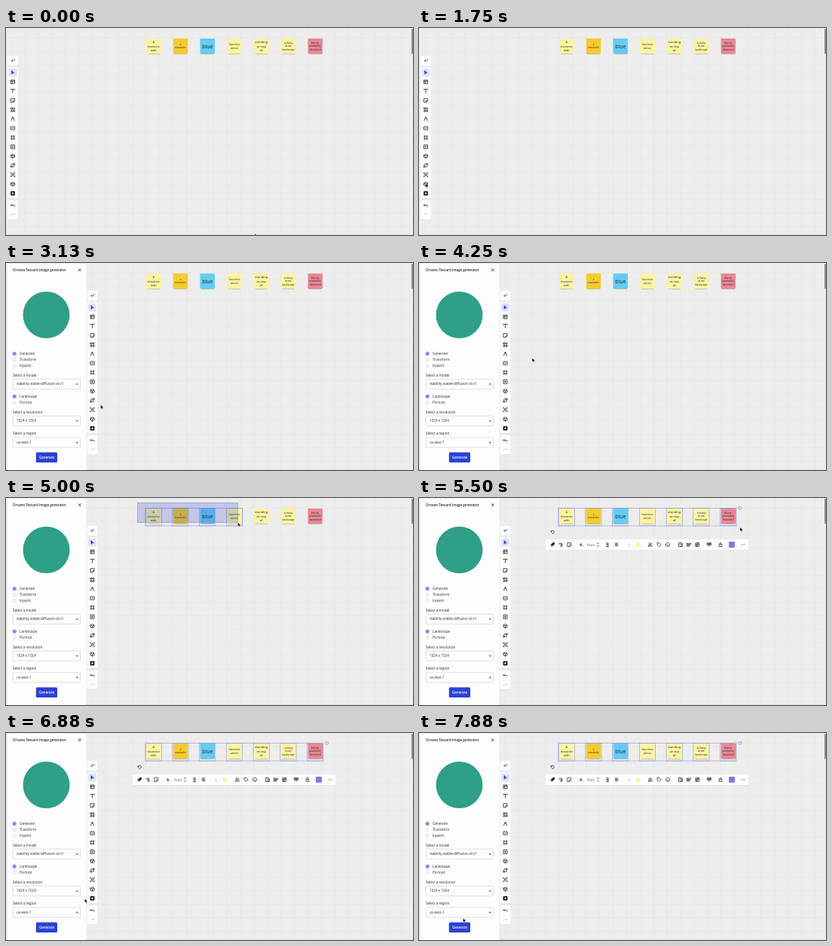
Write an HTML page that moves like this. It is 540x275 px and loops after 8000 ms.

```html
<!DOCTYPE html>
<html lang="en">
<head>
<meta charset="utf-8">
<title>Image generator board</title>
<style>
  html, body { margin: 0; width: 100%; height: 100%; overflow: hidden; background: #ededed; }
  svg { display: block; width: 540px; height: 275px; font-family: "Open Sans", "Noto Sans", sans-serif; fill: #2b2b33; }
  .icon { fill: none; stroke: #1c1c24; stroke-width: .8; stroke-linejoin: round; }
  .edge { fill: none; stroke: #8792d6; stroke-width: .55; }
</style>
</head>
<body>
<svg id="stage" viewBox="0 0 540 275"></svg>
<script>
const LOOP = 8000, STEP = 125;
const BLUE = '#2b42d4', INK = '#1c1c24';

const rect = (x, y, w, h, fill, extra = '') =>
  `<rect x="${x}" y="${y}" width="${w}" height="${h}" fill="${fill}" ${extra}/>`;
const text = (x, y, size, str, extra = '') =>
  `<text x="${x}" y="${y}" font-size="${size}" ${extra}>${str}</text>`;
const icon = (x, y, d, extra = '') =>
  `<path class="icon" transform="translate(${x} ${y})" d="${d}" ${extra}/>`;
const group = (id, body) => `<g id="${id}">${body}</g>`;
const card = (x, y, w, h) =>
  rect(x, y + .4, w, h, '#e0e0e3', 'rx="1.8"') + rect(x, y, w, h, '#fdfdfd', 'rx="1.8"');

const shape = {
  spark: 'M-.6-1.9v3.8M-2.5 0h3.8M2-2.2v1.6M1.2-1.4h1.6',
  arrow: 'M-1.6-2.7L2 .7L.2 .9L-1.6 2.4Z',
  layout: 'M-2.5-2.4h5v4.8h-5zM-2.5-.8h5M-.6-.8v3.2',
  type: 'M-2.6-1.4v-1.1h5.2v1.1M0-2.5v5.1',
  sticky: 'M-2.5-2.4h5v3l-1.9 1.9h-3.1zM2.5 .6h-1.9v1.9',
  shapes: 'M-2.6-2.5h2.2v2h-2.2zM1.6-2.6a1 1 0 1 0 .1 0M-1.5 .5l-1.2 2h2.4zM.7 .7h1.9v1.8h-1.9z',
  pen: 'M-2 2.5L-1.1-1L0-2.6L1.1-1L2 2.5M0-2.4v2',
  comment: 'M-2.6-2.1h5.2v4h-2l-.6 .7l-.6-.7h-2zM-1 0h2',
  frame: 'M-1.7-2.8v5.6M1.7-2.8v5.6M-2.8-1.7h5.6M-2.8 1.7h5.6',
  plus: 'M-2.5-2.5h5v5h-5zM-1.3 0h2.6M0-1.3v2.6',
  cube: 'M0-2.6L2.5-1.4V1.4L0 2.6L-2.5 1.4V-1.4ZM-2.5-1.4L0-.1L2.5-1.4M0-.1V2.6',
  link: 'M-2.7 .5h2v2h-2zM.6-2.5h2v2h-2zM-2-.6q0-1.4 1.7-1.4M2 .6q0 1.5-1.7 1.5',
  focus: 'M-2.7-1.3v-1.4h1.4M1.3-2.7h1.4v1.4M2.7 1.3v1.4h-1.4M-1.3 2.7h-1.4v-1.4M-1.2-1.2h2.4v2.4h-2.4z',
  undo: 'M-1.4-1.8L-2.6-.6L-1.4 .6M-2.6-.6H1q1.6 .1 1.6 2'
};

function grid() {
  const gap = 17.87;
  let d = '';
  for (let x = 7.3; x < 540; x += gap) d += `M${x.toFixed(1)} 0v275`;
  for (let y = 13.2; y < 275; y += gap) d += `M0 ${y.toFixed(1)}h540`;
  return `<path d="${d}" stroke="#e6e6e6" stroke-width=".8"/>`;
}

const YELLOW = '#fbf3a2';
const notes = [
  [YELLOW, 3.8, 'A', 'character', 'with'],
  ['#f3cb2f', 2.8, 'a', 'moustache'],
  ['#64ccf5', 7, 'blue'],
  [YELLOW, 3.6, 'futuristic', 'armor'],
  [YELLOW, 4.2, 'standing', 'on top', 'of'],
  [YELLOW, 3.5, 'a dusty', 'dune', 'landscape'],
  ['#ea8794', 3.5, 'blurry,', 'pixelated,', 'distorted']
];
const noteX = i => 195.8 + i * 35.75;

function note([fill, size, ...lines], i) {
  const x = noteX(i), gap = size * 1.34;
  const top = 24.2 - (lines.length - 1) * gap / 2 + size * .35;
  return rect(x - 8.2, 33.6, 16.4, 1.5, '#a5a48f', 'rx=".7" opacity=".75"') +
    rect(x - 9.7, 14, 19.4, 20.2, fill) +
    lines.map((s, n) => text(x, top + n * gap, size, s, 'text-anchor="middle" fill="#24241c"')).join('');
}

function toolbar() {
  const names = ['layout', 'type', 'sticky', 'shapes', 'pen', 'comment', 'frame', 'plus', 'cube', 'link', 'focus'];
  return card(2, 37, 14, 13) + card(2, 52, 14, 174) + card(2, 229, 14, 25) +
    icon(9, 43.5, shape.spark, 'style="stroke:#4a5cc0"') +
    rect(3.5, 53.5, 11, 11, '#dfe4ff', 'rx="1.5"') +
    icon(9, 59, shape.arrow, `style="stroke:${BLUE};fill:${BLUE};stroke-width:.5"`) +
    names.map((n, i) => icon(9, 71.5 + i * 12.33, shape[n])).join('') +
    group('hover', rect(3.5, 202, 11, 11, '#dfe4ff', 'rx="1.5"')) +
    icon(9, 207.5, shape.cube, 'id="app"') +
    rect(6.1, 216.7, 5.8, 5.8, INK, 'rx=".8"') +
    icon(9, 219.6, 'M-1.5 0h3M0-1.5v3', 'style="stroke:#fff"') +
    icon(9, 236, shape.undo) +
    `<g transform="translate(9 248) scale(-1 1)">${icon(0, 0, shape.undo, 'style="stroke:#cfcfd4"')}</g>`;
}

const radio = (y, label, on) =>
  `<circle cx="11.2" cy="${y}" r="2.1" fill="#fff" stroke="${on ? BLUE : '#bdbdc5'}" stroke-width="${on ? .8 : .5}"/>` +
  (on ? `<circle cx="11.2" cy="${y}" r="1.1" fill="${BLUE}"/>` : '') +
  text(18, y + 1.6, 4.65, label);
const select = (y, label, value) =>
  text(9, y - 3.4, 4.6, label) +
  rect(9.2, y, 89.4, 13.2, '#fdfdfd', 'rx="1.3" stroke="#c9c9d0" stroke-width=".6"') +
  text(14, y + 8.2, 4.6, value) +
  `<path d="M92.5 ${y + 6}h3.6l-1.8 1.9z" fill="#55555f"/>`;

function panel() {
  return rect(2, 1, 104.5, 276, '#fdfdfd', 'rx="1.5"') +
    text(9, 11, 4.5, 'Orvano Tessard image generator', 'font-weight="600"') +
    icon(97.7, 9.2, 'M-1.8-1.8L1.8 1.8M-1.8 1.8L1.8-1.8') +
    '<circle cx="53.5" cy="69" r="31" fill="#2f9f88"/>' +
    radio(120.5, 'Generate', true) + radio(128.5, 'Transform') + radio(136.5, 'Inpaint') +
    select(154.2, 'Select a model', 'stability.stable-diffusion-xl-v1') +
    radio(177.3, 'Landscape', true) + radio(185.2, 'Portrait') +
    select(203.2, 'Select a resolution', '1024 x 1024') +
    select(231.8, 'Select a region', 'us-east-1') +
    rect(39.8, 251.5, 28.2, 13.5, BLUE, 'rx="1.5"') +
    text(54, 259.9, 4.5, 'Generate', 'fill="#fff" font-weight="600" text-anchor="middle"');
}

function handles() {
  const corners = [[185, 13.3], [420.5, 13.3], [185, 37], [420.5, 37]];
  return corners.map(([x, y]) =>
      `<circle cx="${x}" cy="${y}" r="1" fill="#fff" stroke="#8792d6" stroke-width=".5"/>`).join('') +
    '<circle cx="426" cy="13.3" r="2.1" fill="#dcdce0" stroke="#a0a0a8" stroke-width=".7"/>' +
    icon(177.2, 45.3, 'M-2.2-1.8v1.7h1.7M-2-.4a2.1 2.1 0 1 1 .9 2.1', 'style="stroke-width:.7"');
}

function contextBar() {
  const items = [
    [177, 'M-2.6 2.6l1.3-1.6M-1.8-.2L1-2.6h1.7v1.7L.2 1.8zM-.5 2.2l-1.7-1.7', INK],
    [188, 'M-2.5 0a2.4 2 0 1 1 2.4 2h2.3M-.5 1a1.3 1 0 1 0 0-1.9'],
    [199.3, shape.sticky],
    [215, 'M-1.6 1.7L-.3-1.7L1 1.7M-1.1 .6h1.6M1.6 1.7h1'],
    [237.5, 'M-1.2-1.2L0-2.5L1.2-1.2M-1.2 1.2L0 2.5L1.2 1.2'],
    [250, 'M-1-2.4h1.4a1.1 1.1 0 0 1 0 2.2h-1.4zM-1-.2h1.7a1 1 0 0 1 0 1.9h-1.7M-2 2.7h4'],
    [262, 'M-2.4-2h4.8M-1.5-.7h3M-2.4 .6h4.8M-1.5 1.9h3'],
    [307, 'M-.8-2.4a1.2 1.2 0 1 0 .1 0M-2.7 2.2q0-2.1 2-2.1t2 2.1zM1.3-2q1.4 .3 .6 1.9M2.5 2.2v-1'],
    [318.5, 'M-2.5-2.5h2.6l2.5 2.6l-2.5 2.5l-2.6-2.6zM-1.2-1.2h.2'],
    [330, 'M0-2.6a2.6 2.6 0 1 0 .1 0M-1.2 .5q1.2 1.4 2.4 0M-1-.8v.3M1-.8v.3'],
    [347, 'M-2.5-2.5h3.6v5h-3.6zM1.1-1.2h1.5v3.7h-3M-1.3-1h1.2M-1.3 .3h1.2'],
    [358, 'M-2.6-2.6v5.2M-1.4-1.9h4v1.5h-4zM-1.4 .6h2.4v1.5h-2.4z'],
    [369.3, 'M-2.5-2.4h5v4.8h-5zM-2.5 0h5M-1.5 2.4l3.2-4.8M-.5-2.4v4.8'],
    [385, 'M-2.6-2.3h5.2v2.6h-5.2zM-2.6-1h5.2M0 .3v2.4M-.9-2.3v2.6M.9-2.3v2.6'],
    [400, 'M-1.9-.5h3.8v3h-3.8zM-1.1-.5v-1a1.1 1.1 0 0 1 2.2 0v1']
  ];
  return card(168, 55, 269, 14) +
    items.map(([x, d, fill = 'none']) => icon(x, 62, d, `style="stroke-width:.7;fill:${fill}"`)).join('') +
    text(223, 63.8, 4.7, 'Auto', 'fill="#6a6a74"') +
    text(277.7, 63.8, 4.7, 'L', 'fill="#8a8a92"') +
    '<circle cx="290.7" cy="62" r="3.2" fill="#fbf3a2"/>' +
    rect(411, 58, 8, 8, '#9272e0', 'rx="1.3"') +
    [428, 430, 432].map(x => `<circle cx="${x}" cy="62" r=".5" fill="${INK}"/>`).join('');
}

const outlines = notes.map((_, i) =>
  rect(noteX(i) - 10.7, 13.3, 21.2, 23.7, 'none', 'class="edge outline"')).join('');

const stage = document.getElementById('stage');
stage.innerHTML = rect(0, 0, 540, 275, '#ededed') + grid() +
  notes.map(note).join('') + outlines +
  rect(185, 13.3, 0, 23.7, 'none', 'id="bounds" class="edge"') +
  rect(174.5, 6.5, 0, 0, '#1a2fc8', 'id="marquee" fill-opacity=".2" stroke="#7f8ae0" stroke-width=".6"') +
  group('handles', handles()) + group('bar', contextBar()) +
  rect(538, 1, 2, 33.5, '#8c8c90', 'rx=".8"') + rect(0, 274.3, 540, .7, '#d4d4d7') +
  group('panel', panel()) + group('tools', toolbar()) +
  group('cursor',
    '<path id="pointer" d="M0 0V5.2L1.3 4.1L2.2 6L3.1 5.6L2.3 3.8L3.9 3.6Z" fill="#000" stroke="#fff" stroke-width=".4"/>' +
    '<path id="hand" d="M0 .3q.5-.6 1 0v2l2.4 .6q.6 .2 .5 1l-.5 2h-2.4l-1.8-2q0-.7 .8-.4z" fill="#fff" stroke="#111" stroke-width=".6"/>');

const el = id => document.getElementById(id);
const show = (node, on) => node.setAttribute('visibility', on ? 'visible' : 'hidden');
const marquee = el('marquee'), outlineNodes = [...document.querySelectorAll('.outline')];

// time, x, y of the pointer tip
const path = [
  [0, 330, 273], [125, 328, 272], [875, 8.5, 206], [2500, 9, 207], [3125, 125.5, 188.5],
  [3625, 126, 187], [4375, 155, 114], [4625, 174.5, 6.5], [5000, 307.5, 32.5],
  [5250, 416, 37.5], [5375, 426, 39], [6000, 426, 39], [7000, 58.5, 246], [LOOP, 58.5, 246]
];

function pointerAt(t) {
  const n = path.findIndex(p => p[0] > t);
  const [t0, x0, y0] = path[n - 1], [t1, x1, y1] = path[n];
  const k = (t - t0) / (t1 - t0);
  return [x0 + (x1 - x0) * k, y0 + (y1 - y0) * k];
}

function draw(now) {
  // The screen refreshes eight times a second.
  const t = Math.floor((now % LOOP) / STEP) * STEP;
  const [x, y] = pointerAt(t);
  const hover = t >= 1875 && t < 2500, open = t >= 2500;
  const dragging = t >= 4625 && t < 5500, selected = t >= 5500;

  show(el('panel'), open);
  el('tools').setAttribute('transform', `translate(${open ? 105.5 : 0} 0)`);
  show(el('hover'), hover);
  el('app').style.stroke = hover ? BLUE : INK;

  show(marquee, dragging);
  if (dragging) {
    marquee.setAttribute('width', Math.max(0, x - 174.5));
    marquee.setAttribute('height', Math.max(0, y - 6.5));
  }

  const caught = notes.filter((_, i) => selected || dragging && x > noteX(i) - 10 && y > 14).length;
  outlineNodes.forEach((node, i) => show(node, i < caught));
  show(el('bounds'), caught > 0);
  el('bounds').setAttribute('width', caught ? noteX(caught - 1) - 174.5 : 0);
  show(el('handles'), selected);
  show(el('bar'), selected);

  el('cursor').setAttribute('transform', `translate(${x} ${y})`);
  show(el('pointer'), !hover);
  show(el('hand'), hover);
}

const start = performance.now();
function tick() {
  draw(performance.now() - start);
  requestAnimationFrame(tick);
}
tick();
</script>
</body>
</html>
```
